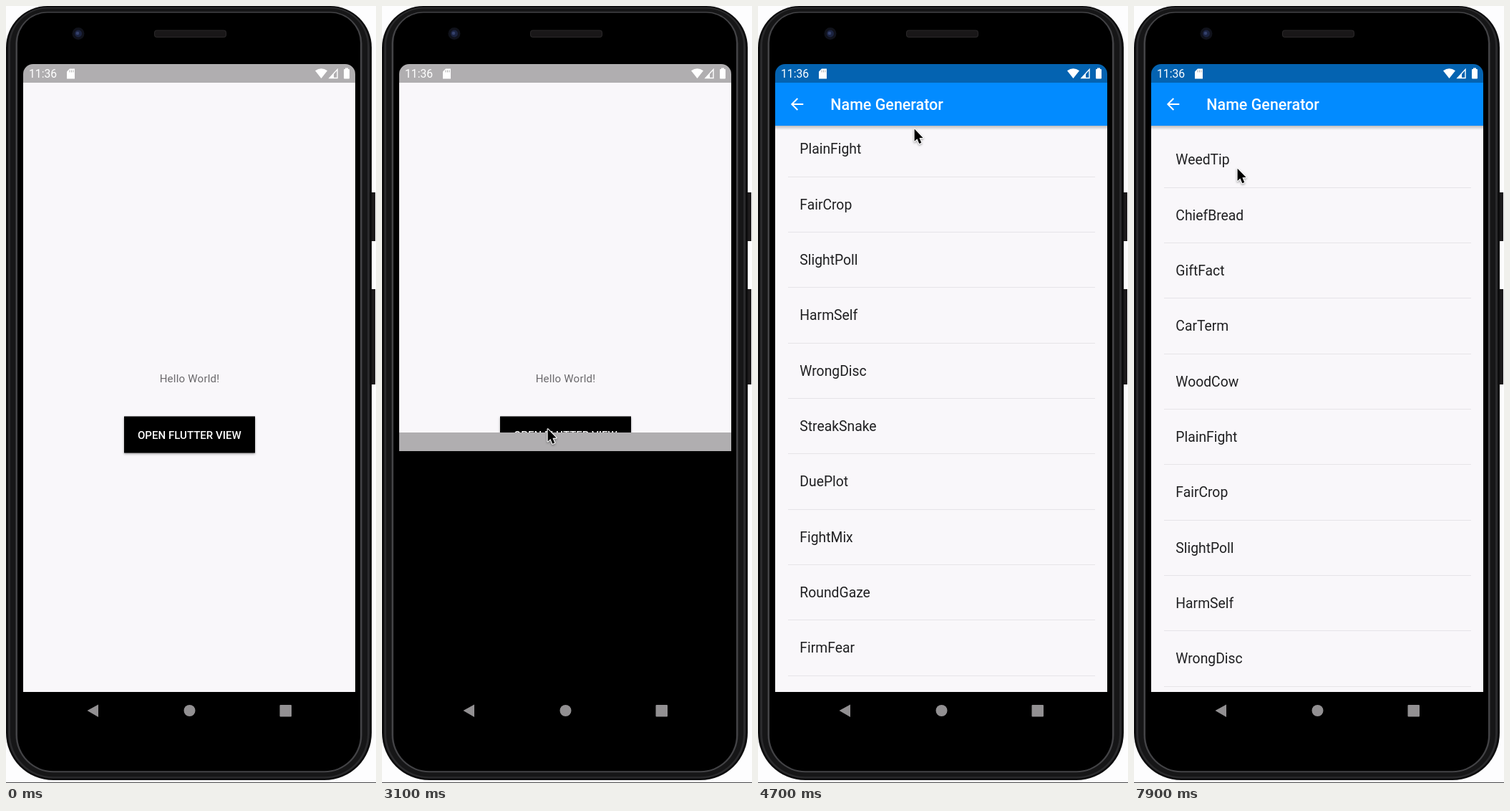
An HTML page with a canvas for the animation above (8000 ms loop, 517 px wide and 1084 px high).

```html
<!DOCTYPE html>
<html lang="en">
<head>
<meta charset="utf-8">
<title>Name Generator</title>
<style>
  html, body { margin: 0; width: 100%; height: 100%; overflow: hidden; background: #fdfdfe; }
  canvas { display: block; width: 517px; height: 1084px; }
</style>
</head>
<body>
<canvas id="stage" width="517" height="1084"></canvas>
<script>
const ctx = document.getElementById('stage').getContext('2d');
const LOOP = 8000, STEP = 100;
const LEFT = 24, TOP = 81, WIDTH = 464, HEIGHT = 876, WINDOW = 927;
const STATUS_H = 26, BAR_END = 167, ROW = 77.33;
const PAGE = '#f9f7fa', STATUS = '#b0aeb0';
const FONT = 'Roboto, "Noto Sans", sans-serif';
const WORDS = ['WeedTip', 'ChiefBread', 'GiftFact', 'CarTerm', 'WoodCow', 'PlainFight',
  'FairCrop', 'SlightPoll', 'HarmSelf', 'WrongDisc', 'StreakSnake', 'DuePlot',
  'FightMix', 'RoundGaze', 'FirmFear', 'SmallBoat', 'ClearTone'];

const PRESS = 2800, OPEN = 2896, OPEN_TIME = 440, LOADED = 3300;
const DRAG = 3600, RELEASE = 6100, GRAB_Y = 572.4;

// Stops of the pointer: time, x, y
const STOPS = [
  [600, 128, 914], [700, 174, 657], [900, 260, 630], [1200, 227, 592.5],
  [1700, 231, 589.5], [DRAG, 231, 589.5], [4700, 218, 170.8], [5200, 218, 170.8],
  [RELEASE, 231, 830], [6500, 228, 391.5], [7100, 230, 245], [7500, 144, 226]
];

const clamp = v => Math.min(1, Math.max(0, v));
const ease = v => { const u = clamp(v); return u * u * (3 - 2 * u); };

function pointerAt(t) {
  const i = STOPS.findIndex(s => s[0] > t);
  if (i < 0) return STOPS[STOPS.length - 1].slice(1);
  const [t0, x0, y0] = STOPS[i - 1], [t1, x1, y1] = STOPS[i];
  const k = ease((t - t0) / (t1 - t0));
  return [x0 + (x1 - x0) * k, y0 + (y1 - y0) * k];
}

// The list follows the finger once it has moved past the touch slop
function scrollAt(t) {
  return t < DRAG || t > RELEASE ? 0 : Math.max(0, GRAB_Y - pointerAt(t)[1]);
}

function slideAt(t) {
  return Math.round(WINDOW * (1 - ease((t - OPEN) / OPEN_TIME)));
}

function rect(x, y, w, h, color) {
  ctx.fillStyle = color;
  ctx.fillRect(x, y, w, h);
}

function round(x, y, w, h, r, fill) {
  ctx.beginPath();
  ctx.roundRect(x, y, w, h, r);
  ctx.fillStyle = fill;
  ctx.fill();
}

function poly(points, fill) {
  ctx.beginPath();
  points.forEach(([x, y]) => ctx.lineTo(x, y));
  ctx.closePath();
  if (fill) { ctx.fillStyle = fill; ctx.fill(); }
}

function circle(x, y, r, color) {
  ctx.beginPath();
  ctx.arc(x, y, r, 0, Math.PI * 2);
  ctx.fillStyle = color;
  ctx.fill();
}

function text(str, x, y, size, color, weight = 400, align = 'left', spacing = 0) {
  ctx.font = `${weight} ${size}px ${FONT}`;
  ctx.letterSpacing = spacing + 'px';
  ctx.textAlign = align;
  ctx.fillStyle = color;
  ctx.fillText(str, x, y);
}

function clipped(x, y, w, h, draw) {
  ctx.save();
  ctx.beginPath();
  ctx.rect(x, y, w, h);
  ctx.clip();
  draw();
  ctx.restore();
}

// One layer of the case, inset from the outline
function shell(inset, color) {
  const top = Math.max(12, 58 - inset), bottom = Math.max(12, 66 - inset);
  round(inset, inset * 0.6, 511 - 2 * inset, 1080 - inset * 1.4, [top, top, bottom, bottom], color);
}

function phone() {
  rect(0, 0, 517, 1084, '#fdfdfe');
  rect(0, 1083, 517, 1, '#4a4a4c');
  rect(510, 260, 6, 68, '#1c1a1b');
  rect(510, 395, 6, 133, '#1c1a1b');
  shell(0, '#0c0c0d');
  shell(3, '#2a2a2c');
  shell(6, '#161617');
  shell(13.5, '#434346');
  shell(16, '#000');
  circle(101, 38.5, 8.5, '#10121b');
  circle(101, 38.5, 5, '#1b2340');
  circle(100, 38, 2.3, '#35416c');
  round(207, 33.5, 101, 10.5, 4, '#2a2829');
  round(208, 34.5, 99, 8.5, 3, '#191718');
}

function home(t) {
  rect(LEFT, TOP, WIDTH, HEIGHT, PAGE);
  rect(LEFT, TOP, WIDTH, STATUS_H, STATUS);
  text('Hello World!', 256.5, 525, 15.04, '#6b696c', 400, 'center', 0.22);
  ctx.save();
  ctx.shadowColor = 'rgba(0,0,0,.35)';
  ctx.shadowBlur = 3;
  ctx.shadowOffsetY = 1.5;
  rect(165, 572.5, 183, 51, '#000');
  ctx.restore();
  if (t >= PRESS && t < PRESS + 300) {
    const r = 50 + (t - PRESS) * 0.5;
    clipped(165, 572.5, 183, 51, () => circle(231, 592, r, 'rgba(255,255,255,.2)'));
  }
  text('OPEN FLUTTER VIEW', 256.3, 603.8, 15.04, '#fff', 500, 'center');
}

function backArrow(x, y) {
  ctx.strokeStyle = '#fff';
  ctx.lineWidth = 2;
  ctx.beginPath();
  ctx.moveTo(x + 16, y);
  ctx.lineTo(x + 0.5, y);
  ctx.moveTo(x + 8, y - 8);
  ctx.lineTo(x, y);
  ctx.lineTo(x + 8, y + 8);
  ctx.stroke();
}

function list(scroll) {
  rect(LEFT, TOP, WIDTH, HEIGHT, PAGE);
  clipped(LEFT, BAR_END, WIDTH, TOP + HEIGHT - BAR_END, () => {
    WORDS.forEach((word, i) => {
      const y = i * ROW - scroll;
      text(word, 58.3, 221.4 + y, 19.33, '#202022');
      rect(42, Math.round(252.6 + y), 429, 1, '#e6e4e8');
    });
  });
  const shade = ctx.createLinearGradient(0, BAR_END, 0, BAR_END + 6);
  shade.addColorStop(0, 'rgba(0,0,0,.24)');
  shade.addColorStop(1, 'rgba(0,0,0,0)');
  rect(LEFT, BAR_END, WIDTH, 6, shade);
  rect(LEFT, TOP, WIDTH, STATUS_H, '#0463b1');
  rect(LEFT, TOP + STATUS_H, WIDTH, BAR_END - TOP - STATUS_H, '#028bff');
  backArrow(47.3, 137);
  text('Name Generator', 101.3, 145.4, 21.48, '#fff', 500);
}

function systemIcons() {
  text('11:36', 32, 100.2, 15.7, '#fff');
  poly([[89, 87.5], [96, 87.5], [96, 101.5], [85, 101.5], [85, 91.5]], '#fff');
  [88.5, 91, 93.5].forEach(x => rect(x, 89.5, 1, 3, 'rgba(120,120,120,.6)'));
  ctx.beginPath();
  ctx.moveTo(440.5, 101);
  ctx.lineTo(432, 90.3);
  ctx.quadraticCurveTo(440.5, 84, 449, 90.3);
  ctx.fillStyle = '#fff';
  ctx.fill();
  poly([[463, 88.5], [463, 100.5], [452, 100.5]]);
  ctx.strokeStyle = '#fff';
  ctx.lineWidth = 1.4;
  ctx.stroke();
  poly([[458, 94], [458, 100.5], [452, 100.5]], '#fff');
  round(472, 88, 8, 13.5, 1, '#fff');
  rect(474, 86.5, 4, 2, '#fff');

  const gray = '#929092';
  poly([[113.5, 983], [129, 974.5], [129, 992]], gray);
  circle(256.5, 983, 8, gray);
  round(382.5, 975, 16.5, 16.5, 1, gray);
}

function screenCorners() {
  const r = 14;
  ctx.fillStyle = '#000';
  [[LEFT, 1], [LEFT + WIDTH, -1]].forEach(([x, side]) => {
    ctx.beginPath();
    ctx.moveTo(x, TOP);
    ctx.lineTo(x + side * r, TOP);
    ctx.arcTo(x, TOP, x, TOP + r, r);
    ctx.fill();
  });
}

function pointer(x, y) {
  ctx.save();
  ctx.translate(x, y);
  ctx.lineJoin = 'round';
  poly([[0.6, 0.8], [0.6, 18], [4.4, 14.5], [7.3, 21.2], [10.3, 19.9], [7.4, 13.3], [12.6, 13.1]]);
  ctx.shadowColor = 'rgba(0,0,0,.35)';
  ctx.shadowBlur = 3;
  ctx.shadowOffsetY = 1.5;
  ctx.strokeStyle = '#fff';
  ctx.lineWidth = 2.2;
  ctx.stroke();
  ctx.shadowColor = 'transparent';
  ctx.fillStyle = '#000';
  ctx.fill();
  ctx.restore();
}

function shifted(dy, draw) {
  clipped(LEFT, TOP, WIDTH, WINDOW, () => {
    ctx.translate(0, dy);
    draw();
  });
}

function emptyWindow() {
  rect(LEFT, TOP, WIDTH, WINDOW, '#000');
  rect(LEFT, TOP, WIDTH, STATUS_H, STATUS);
}

function draw(t) {
  const dy = slideAt(t), loaded = t >= LOADED;
  phone();
  if (dy > 0) home(t);
  if (!loaded) shifted(dy, emptyWindow);
  // The list covers the system icons until it settles
  if (loaded && dy === 0) list(scrollAt(t));
  systemIcons();
  if (loaded && dy > 0) shifted(dy, () => list(0));
  screenCorners();
  if (t >= STOPS[0][0]) pointer(...pointerAt(t));
}

const start = performance.now();
function tick() {
  const t = (performance.now() - start) % LOOP;
  draw(Math.floor(t / STEP) * STEP);
  requestAnimationFrame(tick);
}
tick();
</script>
</body>
</html>
```
